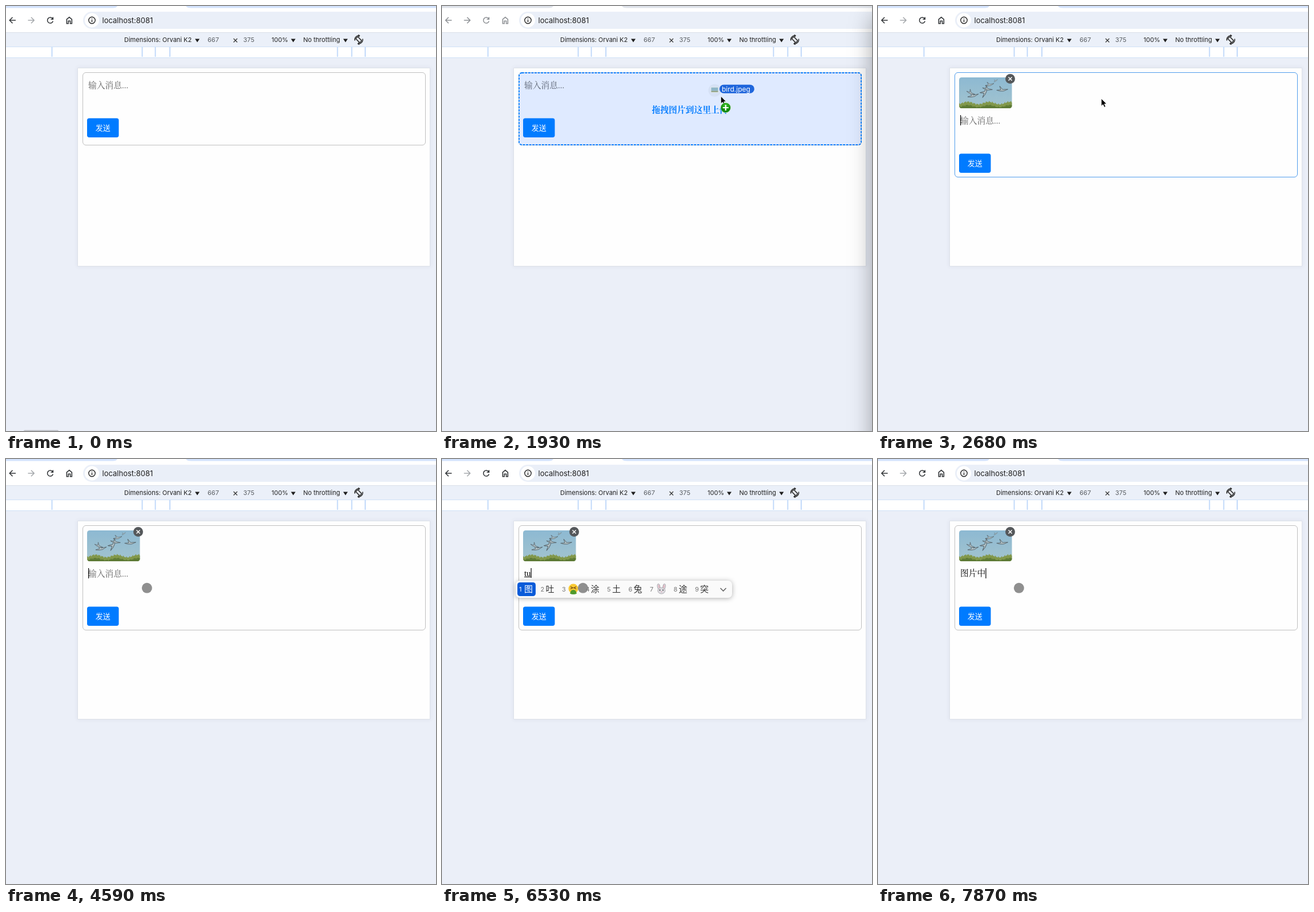
Write an HTML page that moves like this. It is 753 px wide and 744 px high and loops after 8000 ms.

```html
<!DOCTYPE html>
<html lang="zh-CN">
<head>
<meta charset="utf-8">
<title>Image upload demo</title>
<style>
  html, body { margin: 0; width: 100%; height: 100%; overflow: hidden; background: #ebeff8; }
  svg { display: block; position: absolute; left: 0; top: 0; }
  text { white-space: pre; }
  .ui { font-family: Inter, "Noto Sans CJK SC", "Noto Sans CJK", sans-serif; }
  .dev { font-size: 11px; fill: #1f1f1f; }
  .dim { fill: #5a5e63; }
  .page { font: 14.77px "Liberation Serif", "Noto Serif CJK SC", "Noto Sans CJK SC", "Noto Sans CJK", serif; }
  .bold { font-weight: 700; }
  .line { fill: none; stroke-width: 1.6; }
  #device { position: absolute; left: 126px; top: 108.500px; width: 616px; height: 346.500px; background: #fefefe;
    box-shadow: 0 0 0 .6px #d8dce3, 0 0 7px 2px rgba(30, 40, 70, .05); }
  #shade { position: absolute; left: 757px; top: 0; width: 300px; height: 900px;
    box-shadow: 0 18px 40px rgba(0, 0, 0, .4); }
  #panel { filter: drop-shadow(0 1.500px 4px rgba(0, 0, 0, .32)); }
</style>
</head>
<body>
<div id="device"></div>
<svg width="753" height="744" viewBox="0 0 753 744">
  <defs>
    <linearGradient id="sky" x2="0" y2="1">
      <stop stop-color="#8db9d2"/><stop offset="1" stop-color="#a3c4cf"/>
    </linearGradient>
    <radialGradient id="green" cy=".3">
      <stop stop-color="#3fc52c"/><stop offset="1" stop-color="#128a0b"/>
    </radialGradient>
    <clipPath id="photoClip"><rect x="142" y="125" width="92.5" height="54" rx="4.5"/></clipPath>
  </defs>

  <!-- browser chrome -->
  <rect width="753" height="46" fill="#fff"/>
  <path id="tabs" d="M0 0H195Q193 3.5 187 3.5H0ZM315 0H753V3.5H324Q317 3.5 315 0Z"/>
  <path d="M760 10H150a15 15 0 0 0 0 30H760Z" fill="#eaeff8"/>
  <circle cx="150.500" cy="25" r="12.500" fill="#fff"/>
  <g id="nav" class="line">
    <path d="M17 25H6.500M11.500 19.800L6.300 25L11.500 30.200"/>
    <path d="M81.700 22.300A5 5 0 1 0 82.300 26.500M82.300 19.500V23.300H78.500"/>
    <path d="M106.300 23.300L110.800 19.600L115.300 23.300V30.700H112.500V26.300H109.100V30.700H106.300Z"/>
  </g>
  <path id="fwd" class="line" d="M38.500 25H49M44 19.800L49.200 25L44 30.200"/>
  <g class="line" stroke="#222">
    <circle cx="150.500" cy="25" r="5.700" stroke-width="1.400"/>
    <path d="M150.500 24.300V28M150.500 21.700V23" stroke-width="1.500"/>
  </g>
  <text class="ui" x="168.500" y="29.500" font-size="13" fill="#1f1f1f">localhost:8081</text>

  <!-- device toolbar -->
  <rect y="46" width="753" height="26" fill="#ebf0f9"/>
  <path d="M0 46.500H753" stroke="#d9dfe8"/>
  <g class="ui dev">
    <text x="207" y="63">Dimensions: Orvani K2</text>
    <text x="353" y="63" class="dim">667</text>
    <text x="415.500" y="63" class="dim">375</text>
    <text x="465" y="63">100%</text>
    <text x="520.500" y="63">No throttling</text>
  </g>
  <path d="M331 57.500h8l-4 6zM499 57.500h8l-4 6zM590.500 57.500h8l-4 6z" fill="#1f1f1f"/>
  <path d="M398.500 57L405 63.500M405 57L398.500 63.500" stroke="#333" stroke-width="1.200"/>
  <g transform="translate(617.700 59)" class="line" stroke="#333" stroke-width="1.100">
    <rect x="-2.500" y="-5" width="5" height="10" rx="1" transform="rotate(-45)"/>
    <path d="M-6.800 1.500A7 7 0 0 1 1 -7M-1 -8.500L1.300 -7L-.3 -5M6.800 -1.500A7 7 0 0 1 -1 7M1 8.500L-1.300 7L.3 5"/>
  </g>
  <rect y="72" width="753" height="18" fill="#fff"/>
  <path d="M0 71.500H753M0 90.500H753" stroke="#cfe1f6"/>
  <path d="M80.500 72V89M238.500 72V89M261.500 72V89M287 72V89M580.500 72V89M605.500 72V89M629 72V89"
    stroke="#bcd6fa" stroke-width="1.800"/>

  <!-- message box -->
  <rect id="box" x="134.500" y="116.500" width="600" rx="5.500" fill="none"/>
  <g id="photo">
    <g clip-path="url(#photoClip)">
      <rect x="142" y="125" width="93" height="55" fill="url(#sky)"/>
      <path id="grass" fill="#82984b"/>
      <path id="grassDark" fill="#5d7a35"/>
      <g id="birds" stroke="#4b5961" stroke-width=".8" stroke-linejoin="round" fill="#b4c3c7"></g>
    </g>
    <circle cx="231.500" cy="127.500" r="8.500" fill="#55585b"/>
    <path d="M228.500 124.500l6 6m0 -6l-6 6" stroke="#fff" stroke-width="1.500"/>
  </g>
  <text id="hint" class="page" x="144" fill="#666">输入消息...</text>
  <text id="typed" class="page" x="144" y="204.500" fill="#000"></text>
  <rect id="under" x="144" y="206" height="1" fill="#000"/>
  <rect id="caret" y="191" width="1.200" height="18" fill="#000"/>
  <g id="drop">
    <rect x="134.900" y="117" width="599.200" height="126" rx="5" fill="#dfeaff"/>
    <rect x="134.900" y="117" width="599.200" height="126" rx="5" fill="none" stroke="#007bff" stroke-width="1.850" stroke-dasharray="3.700 1.850"/>
    <text class="page" x="144" y="143.500" fill="#5f6775">输入消息...</text>
    <text class="page bold" x="434" y="186.500" text-anchor="middle" fill="#007bff">拖拽图片到这里上传</text>
  </g>
  <g id="send">
    <rect x="142" y="196.500" width="55.500" height="33.500" rx="3.700" fill="#007bff"/>
    <text class="ui" x="156.800" y="218.300" font-size="13" font-weight="500" fill="#fff">发送</text>
  </g>

  <!-- input method panel -->
  <g id="panel">
    <rect x="129" y="213" width="379" height="30" rx="7" fill="#fafafa"/>
    <g id="items" class="ui"></g>
    <path d="M487.500 226l5 5l5 -5" class="line" stroke="#666"/>
  </g>

  <!-- dragged file and pointers -->
  <g id="file">
    <circle cy="1" r="11" fill="#8a8f99" opacity=".1"/>
    <rect x="-7" y="-5" width="14" height="10" fill="#e4ebee"/>
    <rect x="-6" y="-4" width="12" height="6" fill="#8fb6c8"/>
    <rect x="-6" y="2" width="12" height="2" fill="#8b9c7a"/>
    <rect id="pill" x="8.500" y="-9" width="61" height="15" rx="7.500"/>
    <text class="ui" x="12.500" y="3" font-size="12" fill="#fff">bird.jpeg</text>
  </g>
  <g id="arrow">
    <path d="M0 0V13.300L3.100 10.500L5.200 15.300L7.600 14.200L5.500 9.600H9.500Z" fill="#000" stroke="#fff" stroke-width=".9"/>
    <g id="plus" transform="translate(8.500 20.200)">
      <circle r="8.800" fill="url(#green)" stroke="#e6f5e2" stroke-width=".6"/>
      <path d="M-5 0H5M0 -5V5" stroke="#fff" stroke-width="2.200"/>
    </g>
  </g>
  <circle id="touch" r="9" fill="#808080" fill-opacity=".88"/>
  <rect id="tip" y="742.500" width="61" height="3" rx="1.500" fill="#b9bcc3"/>
</svg>
<div id="shade"></div>

<script>
const LOOP = 8000;
const $ = id => document.getElementById(id);
const set = (id, attrs) => { for (const k in attrs) $(id).setAttribute(k, attrs[k]); };
const show = (id, on) => { $(id).style.display = on ? '' : 'none'; };
const move = (id, x, y) => set(id, { transform: `translate(${x} ${y})` });
const between = (t, a, b) => t >= a && t < b;
const at = (steps, t) => steps.reduce((found, s) => t >= s[0] ? s : found, null);

const TU = '图 吐 @sick 涂 土 兔 @hare 途 突';
const T = '他 她 它 天 太 听 头 图 推';
const PIAN = '图片 图谱 图 吐 土 涂 途 突';
const ZHONG = '图片中 图片 图谱 图 吐 土 涂';

// time, text, composing, candidates
const typing = [
  [0, '', 0, ''], [5190, 't', 1, ''], [5790, '', 0, ''], [5940, 't', 1, ''],
  [6240, 't', 1, T], [6380, 'tu', 1, T], [6530, 'tu', 1, TU],
  [6680, 'tu p', 1, PIAN], [6970, 'tu pi', 1, PIAN], [7120, 'tu pian', 1, PIAN],
  [7420, 'tu pian z', 1, ZHONG], [7570, 'tu pian zh', 1, ZHONG],
  [7720, 'tu pian zhong', 1, ZHONG], [7870, '图片中', 0, '']
];

// time, x, y
const touchPath = [
  [3120, 374, 222], [3270, 334, 288], [3410, 297, 315],
  [3560, 265, 285], [3700, 250, 241], [3840, 246.8, 225.8]
];

const icons = {
  sick: '<circle cx="9" cy="-5.500" r="8.500" fill="#f9c934"/>' +
    '<path d="M4 -9l4 2l-4 2M14 -9l-4 2l4 2" fill="none" stroke="#6a4312" stroke-width="1.300"/>' +
    '<path d="M5 -2q4 -3 8 0l2 5q-6 3 -12 0z" fill="#4f9a2c"/>',
  hare: '<g fill="#dddbe0" stroke="#98959d" stroke-width=".7"><ellipse cx="4.500" cy="-9" rx="2.300" ry="5" transform="rotate(-8 4.500 -9)"/>' +
    '<ellipse cx="14" cy="-9" rx="2.300" ry="5" transform="rotate(8 14 -9)"/><ellipse cx="9.300" cy="-2" rx="6.500" ry="5.500"/></g>' +
    '<path d="M4.500 -12l.7 5M14 -12l-.7 5" stroke="#eba8b6" stroke-width="1.500"/>' +
    '<circle cx="6.500" cy="-3" r="1" fill="#333"/><circle cx="12" cy="-3" r="1" fill="#333"/>' +
    '<path d="M8.300 -.5h2l-1 1.300z" fill="#d8758a"/>'
};

function candidates(list) {
  let x = 135, out = '';
  list.split(' ').forEach((word, i) => {
    const icon = word[0] === '@' && icons[word.slice(1)];
    const wide = icon ? 19 : 15 * word.length;
    if (!i) out += `<rect x="132" y="216" width="${wide + 17}" height="24" rx="4.500" fill="#0a5bd9"/>`;
    out += `<text x="${x}" y="232" font-size="11" fill="${i ? '#777' : '#fff'}">${i + 1}</text>`;
    out += icon ? `<g transform="translate(${x + 11} 232.500)">${icon}</g>`
      : `<text x="${x + 9}" y="233.300" font-size="15" fill="${i ? '#333' : '#fff'}">${word}</text>`;
    x += wide + 22.5;
  });
  return out;
}

function paintPhoto() {
  const blades = (base, high, gap) => {
    let d = 'M142 180';
    for (let x = 142; x <= 235; x += gap) {
      const rise = 1 + Math.sin(x * .17) + .5 * Math.sin(x * 2.3) + .4 * Math.sin(x * 5.1);
      d += `L${x} ${(base - high * rise).toFixed(1)}`;
    }
    return d + 'V180Z';
  };
  set('grass', { d: blades(172, 2.2, 1) });
  set('grassDark', { d: blades(177, 1.8, 1.5) });
  // x, y, size, turn
  const flock = [[166, 157, 1, 0], [162, 152, .8, 35], [187, 151, 1.1, -55],
    [191, 145, .9, 25], [195, 138, .8, 0], [217, 147, 1, 10], [206, 131, .4, -20]];
  $('birds').innerHTML = flock.map(([x, y, s, r]) =>
    `<path transform="translate(${x} ${y}) rotate(${r}) scale(${s})" d="M-9 2L-2 0L-5 -6L1 -1L10 -3L3 1.500L-3 2.500Z"/>`).join('');
}

let lastList = '';

function render(t) {
  const away = between(t, 150, 2680);
  const uploaded = t >= 2680;
  const shift = uploaded ? 62 : 0;

  set('tabs', { fill: away ? '#dfe3ea' : '#d3e3fd' });
  set('nav', { stroke: away ? '#8f9296' : '#333639' });
  set('fwd', { stroke: away ? '#8f9296' : '#a6a9ad' });
  show('shade', away);
  show('tip', t < 590);
  set('tip', { x: t < 440 ? 31 : 76 });

  set('box', { height: uploaded ? 183 : 127, stroke: between(t, 2680, 2820) ? '#4f9cec' : '#bfbfbf' });
  show('photo', uploaded);
  move('send', 0, shift);
  set('hint', { y: 143.5 + shift });

  // drag in
  const drag = between(t, 1780, 2680);
  const k = Math.min(1, Math.max(0, Math.floor((t - 1780) / 150) / 5));
  const e = 1 - (1 - k) ** 2;
  show('drop', between(t, 1930, 2680));
  show('file', drag);
  show('plus', drag);
  show('arrow', between(t, 1780, 3120));
  move('file', 562 - 235 * e, 135.5 + 31 * e);
  set('pill', { fill: k ? '#1f66dc' : '#94b4f0' });
  move('arrow', uploaded ? 391 : 543.5 - 153.5 * e, uploaded ? 162 : 156 + 5 * e);

  const spot = at(touchPath, t);
  show('touch', spot);
  if (spot) move('touch', spot[1], spot[2]);

  // typing
  const [, text, composing, list] = at(typing, t);
  $('typed').textContent = text;
  const width = text ? $('typed').getComputedTextLength() : 0;
  show('hint', !text);
  show('under', composing);
  set('under', { width });
  set('caret', { x: 144 + width, height: composing ? 17 : 18 });
  show('caret', uploaded && !between(t, 3120, 3560) && !between(t, 4140, 4590));
  show('panel', list);
  if (list && list !== lastList) $('items').innerHTML = candidates(lastList = list);
}

paintPhoto();
const start = performance.now();
function tick() {
  render((performance.now() - start) % LOOP);
  requestAnimationFrame(tick);
}
tick();
</script>
</body>
</html>
```
